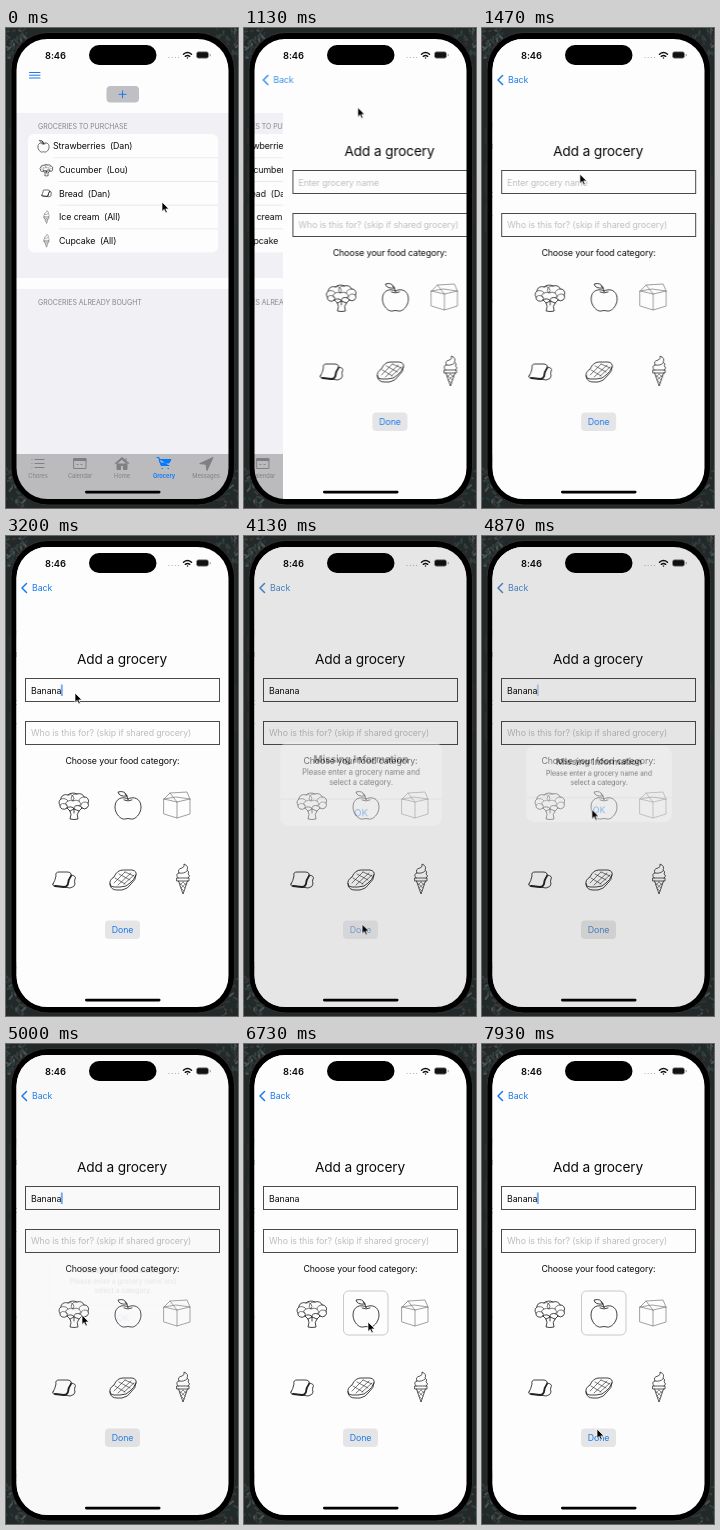
These frames come from a looping animation (232 px wide and 480 px high, 8000 ms). An HTML page:

```html
<!DOCTYPE html>
<html lang="en">
<head>
<meta charset="utf-8">
<title>Grocery list</title>
<style>
html, body { margin: 0; width: 100%; height: 100%; overflow: hidden; background: #1d2322; }
svg { display: block; width: 100%; height: 100%; }
text { font: 8.8px Inter, "Liberation Sans", sans-serif; letter-spacing: -.01em; fill: #0a0a0a; }
.mid { text-anchor: middle; }
.caps { font-size: 7px; fill: #85858b; }
.title { font-size: 13.7px; }
.small { font-size: 6.95px; }
.hint { fill: #bdbdc0; }
.tint { fill: #1a7be8; }
.field { fill: none; stroke: #4a4a4a; }
.line { fill: none; stroke-linecap: round; stroke-linejoin: round; }
#alert { transform-origin: 117px 248px; }
</style>
</head>
<body>
<svg viewBox="0 0 232 480" preserveAspectRatio="none">
  <defs>
    <clipPath id="screen"><rect x="10.5" y="11" width="212" height="460" rx="31"/></clipPath>
    <g id="broccoli">
      <path d="M-7 3a4 3.500 0 0 1-7-3a4 4 0 0 1 1-6a5 4 0 0 1 7-4a6 4 0 0 1 9-1a5 4 0 0 1 7 3a4 4 0 0 1 4 6a4 4 0 0 1-6 5M-7 3L-4 6Q-2 9-4 14Q0 15 4 14Q2 9 5 6L8 3M-4 6L0 4L5 6M0 4V8M-7 3a4 3 0 0 1 7 1a4 3 0 0 1 8-1"/>
      <path stroke-width=".6" d="M-14 0a4 3 0 0 1 7 3M-13-6a5 4 0 0 1 7 2a4 3 0 0 0-1 5M-6-10a4 4 0 0 1 5 6a4 3 0 0 0-5 0M3-11a5 4 0 0 0-4 7a5 4 0 0 1 6 0M10-8a5 4 0 0 0-5 4a4 4 0 0 1 1 5M14-2a4 3 0 0 0-7 2"/>
    </g>
    <g id="apple">
      <path d="M0-6C-5-9-13-7-13 2C-13 9-7 15-3 14Q0 13 3 14C7 15 13 9 13 2C13-7 5-9 0-6ZM0-6Q-1-10-3-11M-1-9Q-9-8-10-13Q-3-15-1-9M-4-5Q0-3 4-5"/>
    </g>
    <g id="carton" stroke="#777">
      <path stroke-width=".7" d="M-13-6L0-3V13L-13 9ZM0-3L13-6V9L0 13M-13-6L-7-12L10-13L13-6M-7-12L0-3M-13-6L-1-8L13-6"/>
    </g>
    <g id="bread">
      <path d="M-11 4Q-9 1-8-4Q-9-8-5-8L3-8Q8-8 7-4Q4 0 4 4Q3 7 0 7L-9 6Q-12 6-11 4Z"/>
      <path d="M7-5Q13-4 11-1Q10 1 11 4Q11 7 6 8L0 7"/>
      <path stroke-width="1.800" d="M7-4Q4 0 4 4Q3 7 0 7L-9 6"/>
    </g>
    <g id="waffle">
      <path d="M-13 5Q-14 1-9-2Q-6-9 0-9L9-9Q14-8 13-4Q11 1 7 4Q4 8-3 8L-9 8Q-13 8-13 5ZM-13 6Q-12 11-6 11L-1 11Q5 10 8 5Q13 1 13-4"/>
      <path stroke-width=".6" d="M-9 4L2-7M-5 6L8-6M1 5L11-4M-8-1L2 5M-4-5L7 1M2-7L11-3"/>
    </g>
    <g id="cone">
      <path stroke-width=".75" d="M-4.500 2L0 15L4.500 2M-6-1H6V2H-6ZM-5-1Q-8-5-4-6Q-6-10-1-11Q2-12 1-15Q6-13 4-9Q7-7 5-5Q8-3 5-1M-4-6Q1-5 4-8"/>
      <path stroke-width=".5" d="M-3.500 4L2 9M0 3L3 6M3.500 4L-2 9M0 3L-3 6M-1 10L1 12"/>
    </g>
  </defs>

  <rect width="232" height="480" fill="#232928"/>
  <g id="desk" class="line" stroke-width="2"></g>
  <path stroke="#2c2c2e" stroke-width="2" d="M4 100V116M4 137V166M4 176V204M229.5 148V195"/>
  <rect x="5" y="4.5" width="223.5" height="472.5" rx="37" stroke="#303032"/>

  <g clip-path="url(#screen)">
    <g id="list">
      <rect x="10" y="11" width="213" height="461" fill="#fdfdfd"/>
      <path class="line" stroke="#1a7be8" d="M23.5 44.5H34M23.5 47.2H34M23.5 50H34"/>
      <rect x="100.5" y="58" width="32.5" height="16.5" rx="4" fill="#c0c0c4"/>
      <path class="line" stroke="#1a7be8" d="M113 66.3H120M116.5 62.8V69.8"/>
      <path fill="#f0f0f5" d="M10 85H223V250H10ZM10 261H223V427H10Z"/>
      <text class="caps" x="32" y="101">GROCERIES TO PURCHASE</text>
      <rect x="22" y="106" width="190" height="118.5" rx="6" fill="#fdfdfd"/>
      <g id="rows"></g>
      <text class="caps" x="32" y="276.5">GROCERIES ALREADY BOUGHT</text>
      <rect x="10" y="426" width="213" height="46" fill="#bbbbbd"/>
      <g id="tabs"></g>
    </g>

    <g id="add">
      <rect x="10" y="11" width="213" height="461" fill="#fdfdfd"/>
      <text class="mid title" x="116" y="127.5">Add a grocery</text>
      <rect class="field" x="19.5" y="142.5" width="194" height="23"/>
      <rect class="field" x="19.5" y="185.5" width="194" height="23"/>
      <text id="nameHint" class="hint" x="25" y="157.7">Enter grocery name</text>
      <text id="name" x="25" y="157.7"></text>
      <rect id="caret" x="24.8" y="148.5" width="1.2" height="11.5" fill="#1a7be8"/>
      <text class="hint" x="25" y="200.2">Who is this for? (skip if shared grocery)</text>
      <text class="mid" x="116.5" y="228.3">Choose your food category:</text>
      <rect id="pick" x="99.5" y="247" width="44.5" height="44" rx="5" fill="none" stroke="#c8c8c8"/>
      <g id="foods"></g>
      <g id="done">
        <rect x="99" y="384.5" width="35" height="18.5" rx="4" fill="#e5e5e7"/>
        <text class="mid tint" x="116.5" y="397">Done</text>
      </g>
    </g>
    <g id="back">
      <path id="chevron" class="line" stroke="#1a7be8" stroke-width="1.5" d="M20.5 47.5L16 52L20.5 56.5"/>
      <text class="tint" x="26" y="55.3">Back</text>
    </g>

    <g>
      <text x="39" y="30.5" style="font-size:9.4px;font-weight:600">8:46</text>
      <path class="line" stroke="#aaa" stroke-width="1.2" d="M163 29.5h0M166.2 29.5h0M169.4 29.5h0M172.6 29.5h0"/>
      <path class="line" stroke="#111" stroke-width="1.5" d="M177.5 26.2Q181.5 22.8 185.5 26.2M179.3 28.3Q181.5 26.6 183.7 28.3M181.5 30h0"/>
      <rect x="190.5" y="23.8" width="12" height="6.4" rx="2" fill="#111" stroke="#999" stroke-width=".7"/>
      <path stroke="#999" d="M204.2 26V28.2"/>
    </g>
    <rect id="dim" x="10" y="11" width="213" height="461"/>
    <g id="alert">
      <rect x="44" y="210" width="146" height="76" rx="8" fill="#f4f4f4"/>
      <text class="mid" x="117" y="228.5" style="font-size:9.1px;font-weight:600">Missing Information</text>
      <text class="mid small" x="117" y="240">Please enter a grocery name and</text>
      <text class="mid small" x="117" y="248.5">select a category.</text>
      <path stroke="#cfcfd2" stroke-width=".6" d="M44 261.5H190"/>
      <text class="mid" x="117" y="277" style="fill:#1a7be8">OK</text>
    </g>
  </g>

  <rect x="83" y="17" width="67.5" height="20" rx="10"/>
  <rect x="79" y="462.8" width="75.5" height="2.6" rx="1.3"/>
  <path id="cursor" d="M0 0V9.5L2.2 7.4L3.8 10.9L5.3 10.2L3.8 6.9H6.9Z" stroke="#fff" stroke-width=".7"/>
</svg>

<script>
const LOOP = 8000;
const $ = id => document.getElementById(id);
const food = (name, x, y, scale, weight) =>
  `<g class="line" stroke="#222" stroke-width="${weight}" transform="translate(${x} ${y}) scale(${scale})"><use href="#${name}"/></g>`;

// Dark wallpaper showing around the phone
let seed = 7;
const rand = () => (seed = seed * 16807 % 2147483647) / 2147483647;
$('desk').innerHTML = Array.from({ length: 150 }, () => {
  const x = rand() < .5 ? rand() * 22 : 232 - rand() * 22;
  const y = rand() < .5 ? rand() * 30 : 480 - rand() * 40;
  const tone = ['#34413f', '#4a5352', '#233a3a', '#3a3437'][Math.floor(rand() * 4)];
  return `<path stroke="${tone}" d="M${x} ${y}l${rand() * 8 - 4} ${rand() * 8 - 4}"/>`;
}).join('');

const groceries = [
  ['apple', 'Strawberries', 'Dan'], ['broccoli', 'Cucumber', 'Lou'], ['bread', 'Bread', 'Dan'],
  ['cone', 'Ice cream', 'All'], ['cone', 'Cupcake', 'All']
];
$('rows').innerHTML = groceries.map(([icon, item, who], i) => {
  const y = 118 + i * 23.7, first = i === 0;
  const rule = i < 4 ? `<path stroke="#dcdce0" stroke-width=".6" d="M${first ? 47 : 53} ${y + 11.8}H212"/>` : '';
  return food(icon, first ? 37.5 : 40.5, y, .43, 1.5) +
    `<text x="${first ? 47 : 53}" y="${y + 3.2}">${item}\u00a0 (${who})</text>` + rule;
}).join('');

const tabs = [
  ['Chores', 'M-6-4h0M-6 0h0M-6 4h0M-3-4H6M-3 0H6M-3 4H6'],
  ['Calendar', 'M-6-5H6V5H-6ZM-6-4H6M-6-3H6M-3 1h1M1 1h1'],
  ['Home', 'M-7 0L0-6L7 0M-5 0V6H-1.5V2H1.5V6H5V0L0-4ZM4-5V-3', true],
  ['Grocery', 'M-7-6H-5L-3 2H5M-4.5-4H7L5-0.5H-3.5ZM-2 5h.5M4 5h.5', true],
  ['Messages', 'M-6 0L7-6L1 7L0 1Z', true]
];
$('tabs').innerHTML = tabs.map(([label, d, solid], i) => {
  const x = 32 + i * 42, active = label === 'Grocery', color = active ? '#007aff' : '#808084';
  return `<path class="line" transform="translate(${x} 435.5)" stroke="${color}" style="fill:${solid ? color : 'none'}" d="${d}"/>
    <text class="mid" x="${x}" y="449.7" style="font-size:5.8px;fill:${color};font-weight:${active ? 600 : 400}">${label}</text>`;
}).join('');

$('foods').innerHTML = [
  ['broccoli', 68, 269], ['apple', 122, 269], ['carton', 171, 269],
  ['bread', 58, 344], ['waffle', 117, 343], ['cone', 177, 343]
].map(([name, x, y]) => food(name, x, y, 1, .85)).join('');

// Steps are [time, value, easing]; the ends are held
function play(el, prop, steps, easing = 'linear') {
  const all = [[0, steps[0][1]], ...steps, [LOOP, steps.at(-1)[1]]];
  el.animate(all.map(([t, value, ease = easing]) => ({ offset: t / LOOP, [prop]: value, easing: ease })),
    { duration: LOOP, iterations: Infinity });
}
const HARD = 'steps(1, end)';
const SPRING = 'cubic-bezier(.2, .75, .25, 1)';
const shift = (x, y = 0) => `translate(${x}px, ${y}px)`;

// The add page slides over the list while its back button fades in
const push = (from, to) => [[900, from, SPRING], [1510, to]];
play($('list'), 'transform', push(shift(0), shift(-64)));
play($('add'), 'transform', push(shift(213), shift(0)));
play($('back'), 'transform', push(shift(24), shift(0)));
play($('back'), 'opacity', push(0, 1));

const typed = [2470, 2670, 2870, 2970, 3070, 3170];
const name = $('name');
name.innerHTML = [...'Banana'].map(c => `<tspan>${c}</tspan>`).join('');
typed.forEach((t, i) => play(name.children[i], 'fillOpacity', [[0, 0], [t, 1]], HARD));
play($('nameHint'), 'opacity', [[0, 1], [typed[0], 0]], HARD);
play($('caret'), 'transform',
  [[0, shift(0)], ...typed.map((t, i) => [t, shift(name.getSubStringLength(0, i + 1))])], HARD);
play($('caret'), 'opacity', [
  [1780, 0], [1800, 1], [4060, 1], [4100, 0], [4840, 0], [4900, 1], [5440, 1], [5540, 0],
  [5780, 0], [5880, 1], [6440, 1], [6540, 0], [6780, 0], [6880, 1], [7460, 1], [7600, 0], [7780, 0], [7900, 1]
]);

// The alert opens and closes on one curve shared by box, dimming and tint
const modal = (off, on) => [[4080, off, SPRING], [4480, on], [4810, on, SPRING], [5210, off]];
play($('dim'), 'opacity', modal(0, .2));
play($('alert'), 'opacity', modal(0, 1));
play($('alert'), 'transform', [[4080, 'scale(1.2)', SPRING], [4480, 'scale(1)']]);
document.querySelectorAll('.tint').forEach(el => play(el, 'fill', modal('#1a7be8', '#8a98ae')));
play($('chevron'), 'stroke', modal('#1a7be8', '#8a98ae'));
play($('done'), 'opacity', [[3960, 1], [4000, .5], [4080, .5], [4200, 1]]);
play($('pick'), 'opacity', [[0, 0], [6520, 1]], HARD);

const path = [
  [330, 156, 174], [780, 117, 66], [950, 117, 66, 'ease-in'], [1470, 98, 146, 'ease-out'], [1780, 69, 157],
  [3400, 69, 157], [3880, 115, 391], [4080, 117, 391, 'ease-in'], [4270, 128, 365, 'ease-out'],
  [4620, 117, 274], [4800, 117, 274, 'ease-in'], [5000, 76, 271, 'ease-out'], [5330, 66, 276],
  [5800, 66, 276, 'ease-in'], [5980, 42, 330, 'linear'], [6180, 90, 386, 'ease-out'], [6450, 124, 278],
  [6740, 124, 278], [7350, 120, 388], [7500, 120, 388], [7600, 120, 398], [7780, 120, 398], [7930, 115, 385]
];
play($('cursor'), 'transform', path.map(([t, x, y, ease]) => [t, shift(x, y), ease]), 'ease-in-out');
</script>
</body>
</html>
```
